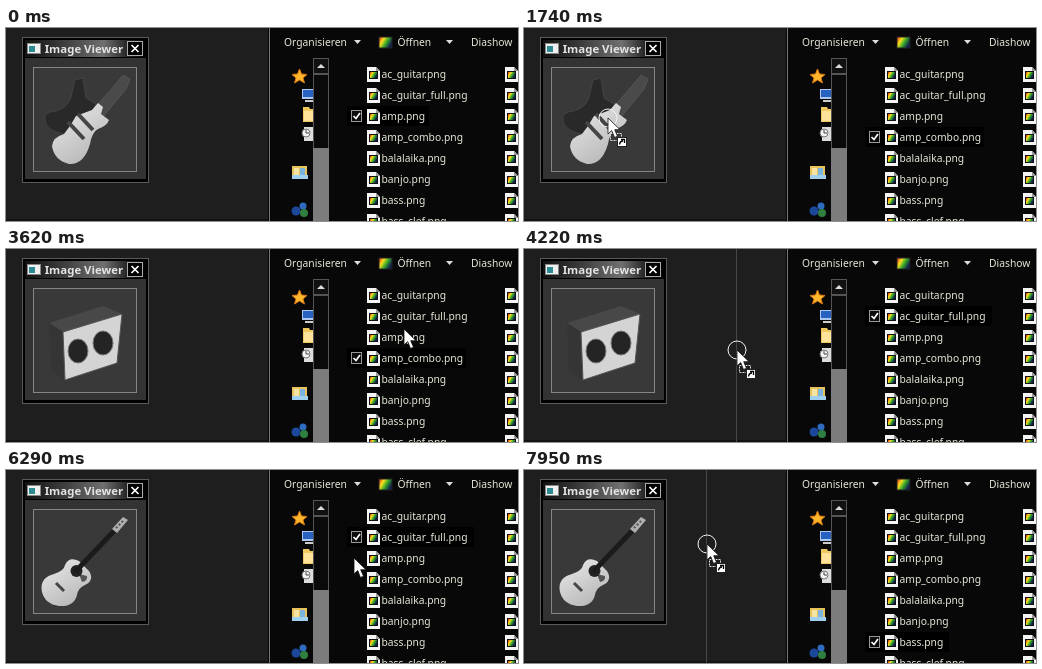
An HTML page that plays this animation: 512 px wide and 193 px high, repeating every 8000 ms.

```html
<!DOCTYPE html>
<html lang="de">
<head>
<meta charset="utf-8">
<title>Image Viewer</title>
<style>
html, body { margin: 0; width: 100%; height: 100%; overflow: hidden; background: #1e1e1e; }
svg { display: block; width: 512px; height: 193px; }
text { font: 10.3px "Noto Sans", "Open Sans", sans-serif; fill: #e8e6d8; }
.title { font-weight: bold; font-size: 11.4px; fill: #e4e4e4; }
</style>
</head>
<body>
<svg viewBox="0 0 512 193">
  <defs>
    <linearGradient id="bar"><stop stop-color="#111"/><stop offset=".3" stop-color="#3a3a3a"/><stop offset=".65" stop-color="#707070"/><stop offset=".85" stop-color="#222"/><stop offset="1" stop-color="#000"/></linearGradient>
    <linearGradient id="rainbow" x2="1" y2=".5"><stop stop-color="#e02810"/><stop offset=".35" stop-color="#f8e020"/><stop offset=".65" stop-color="#38a828"/><stop offset="1" stop-color="#102050"/></linearGradient>
    <linearGradient id="wood" x2=".6" y2="1"><stop stop-color="#ececec"/><stop offset="1" stop-color="#b8b8b8"/></linearGradient>
    <g id="file">
      <path d="M0 0H9L13 4V15H0Z" fill="#f4f4f4"/>
      <path d="M9 0V4H13Z" fill="#999"/>
      <path d="M2 4H11V12H2Z" fill="#111"/>
      <path d="M3 5H10V11H3Z" fill="url(#rainbow)"/>
    </g>
  </defs>

  <rect width="512" height="193" fill="#1e1e1e"/>
  <rect y="191" width="262" height="2" fill="#131313"/>
  <rect id="guide" width="1" height="193" fill="#484848"/>

  <!-- viewer window -->
  <rect x="16.5" y="9.5" width="126" height="145" fill="#000" stroke="#5a5a5a"/>
  <rect x="19" y="12" width="121" height="17" fill="url(#bar)"/>
  <rect x="21.5" y="15.500" width="13" height="10" fill="#f0f0f0" stroke="#888"/>
  <path d="M23 18H29V24H23Z" fill="#2c8a90"/>
  <text class="title" x="38.700" y="25">Image Viewer</text>
  <rect x="121.5" y="13.5" width="15" height="14" fill="#000" stroke="#aaa"/>
  <path d="M125.5 17L132.5 24M132.5 17L125.5 24" stroke="#fff" stroke-width="1.7"/>
  <rect x="19" y="30" width="121" height="121" fill="#333"/>
  <rect x="27.5" y="39.5" width="103" height="104" fill="#393939" stroke="#858585"/>

  <g class="pic">
    <path d="M39 92Q37 84 50 83Q64 79 66 65L69 52L77 50L80 70L90 76L86 102L58 106Q40 103 39 92Z" fill="#292929" stroke="#4b4b4b" stroke-width=".7"/>
    <path d="M86 83L108 58L117 47L124 51L120 61L96 90Z" fill="#4a4a4a" stroke="#5c5c5c" stroke-width=".7"/>
    <path d="M46 118Q47 109 58 106L64 98L70 88L86 82L92 75L97 79L95 86L103 92Q101 98 92 101Q86 104 84 116Q78 137 63 136Q48 132 46 118Z" fill="url(#wood)"/>
    <path d="M62 94L78 111M72 86L87 102" stroke="#444" stroke-width="4"/>
  </g>
  <g class="pic">
    <path d="M43 74L97 57L116 65L57 83Z" fill="#484848"/>
    <path d="M43 74L57 83L59 131L45 122Z" fill="#353535"/>
    <path d="M57 83L116 65L111 114L59 131Z" fill="#d4d4d4" stroke="#555"/>
    <g fill="#242424" stroke="#777">
      <ellipse cx="72" cy="102" rx="10" ry="12"/>
      <ellipse cx="97" cy="94" rx="10" ry="12"/>
    </g>
  </g>
  <g class="pic">
    <path d="M36 122Q33 108 48 104Q58 101 59 95Q63 86 73 91L83 101Q89 110 79 115Q72 118 71 125Q68 137 53 136Q39 134 36 122Z" fill="url(#wood)"/>
    <path d="M73 104L81 106Q82 111 76 112Z" fill="#555"/>
    <circle cx="70.500" cy="101" r="6" fill="#222"/>
    <path d="M69 102L109 60" stroke="#1b1b1b" stroke-width="5"/>
    <path d="M106 59L117 47L122 50L111 63Z" fill="#b0b0b0"/>
    <path d="M110 58L118 50" stroke="#555" stroke-width="2" stroke-dasharray="2 2"/>
    <path d="M50 113L58 121" stroke="#444" stroke-width="3"/>
  </g>

  <!-- file browser -->
  <rect x="262" width="250" height="193" fill="#080808"/>
  <rect x="263" width="1" height="193" fill="#777"/>
  <text x="278" y="18">Organisieren</text>
  <text x="391.500" y="18">Öffnen</text>
  <text x="465" y="18">Diashow</text>
  <path d="M348 12H355L351.500 16ZM440 12H447L443.500 16Z" fill="#ddd"/>
  <rect x="373" y="9" width="13" height="11" fill="url(#rainbow)" stroke="#222"/>

  <path d="M293.500 41L295.500 46L301 46.500L297 50L298.500 55L293.500 52L288.500 55L290 50L286 46.500L291.500 46Z" fill="#ffb52c" stroke="#d97812"/>
  <path d="M296 61H307V71H296Z" fill="#aec8ef"/><path d="M297 62H307V69H297Z" fill="#2862c0"/><path d="M299 72H307V74H299Z" fill="#ccc"/>
  <path d="M297 79H303L304 81H307V94H297Z" fill="#f0c860"/><path d="M298 83H307V93H298Z" fill="#ffe39a"/>
  <path d="M298 99H307V113H298Z" fill="#ddd"/><circle cx="300" cy="105" r="4" fill="#f4f4f4" stroke="#777"/><path d="M300 102V105H303" fill="none" stroke="#444"/>
  <path d="M286 138H301V151H286Z" fill="#e8c35c"/><path d="M288 140H293V147H288Z" fill="#f6e4a4"/><path d="M294 140H299V147H294Z" fill="#7bb4e0"/><path d="M286 147H302V151H286Z" fill="#9fd0f0"/>
  <circle cx="290" cy="183" r="4.500" fill="#1c489c"/><circle cx="297" cy="178" r="3.500" fill="#2f6cc0"/><circle cx="298" cy="185" r="4" fill="#2f8040"/>

  <rect x="307.500" y="46.500" width="15" height="146" fill="#0a0a0a" stroke="#555"/>
  <rect x="307.500" y="30.500" width="15" height="15" fill="#111" stroke="#555"/>
  <path d="M311 40H319L315 36Z" fill="#ddd"/>
  <rect x="307" y="120" width="16" height="73" fill="#7c7c7c"/>

  <rect id="band" x="341" height="20"/>
  <g id="files"></g>
  <g id="check" fill="none" stroke="#999">
    <rect x="345.500" y="-5.500" width="10" height="11" fill="#0c0c0c"/>
    <path d="M347.500 0L350 2.500L354 -3" stroke="#fff" stroke-width="1.700"/>
  </g>

  <g id="cursor">
    <circle id="ring" r="9" fill="none" stroke="#f2f2f2"/>
    <g id="link">
      <rect x="2.500" y="15.500" width="11" height="7" fill="none" stroke="#ddd" stroke-dasharray="2 1"/>
      <rect x="9.500" y="19.500" width="9" height="9" fill="#fff" stroke="#222"/>
      <path d="M11.500 26.500Q12 23 15 23M13 21.500H16.500V25" fill="none" stroke="#000" stroke-width="1.300"/>
    </g>
    <path d="M0 0V16L3.700 12.500L6.500 19.500L9.500 18.200L6.700 11.700H12Z" fill="#fff" stroke="#111" stroke-width=".8"/>
  </g>
</svg>
<script>
const $ = id => document.getElementById(id);
const names = ["ac_guitar", "ac_guitar_full", "amp", "amp_combo", "balalaika", "banjo", "bass", "bass_clef"];
const ends = [447, 468, 423, 460, 444, 429, 425, 441];
const rowY = i => 46 + 21 * i;
const LOOP = 8000, TICK = 58.5;

$("files").innerHTML = names.map((name, i) => {
  const y = rowY(i);
  return `<use href="#file" x="361" y="${y - 7}"/><use href="#file" x="499" y="${y - 7}"/>
    <text x="375.5" y="${y + 4}">${name}.png</text>`;
}).join("");
const labels = document.querySelectorAll("#files text");
const pics = document.querySelectorAll(".pic");

// start, end, ease-out power, then a quadratic curve: from, control, to
const moves = [
  [0, 620, 1, 390, 215, 390, 215, 390, 215],
  [620, 1090, 2, 390, 190, 385, 145, 394, 104],
  [1270, 1800, 2, 394, 104, 240, 125, 80, 89],
  [2780, 3380, 2, 80, 89, 250, 108, 400, 96],
  [3560, 3800, 2, 400, 96, 398, 75, 395, 67],
  [3980, 4700, 2, 395, 67, 224, 128, 67, 79],
  [5820, 6288, 1.3, 67, 79, 220, 45, 348, 88],
  [6290, 6580, 2, 348, 88, 390, 120, 408, 165],
  [6640, 7350, 1.5, 408, 165, 440, 178, 394, 174],
  [7650, 7942, 1.3, 394, 174, 300, 110, 183, 74]
];
// press, drag start, release
const drags = [[1270, 1330, 2040], [3980, 4040, 4950], [7470, 7650, LOOP]];
const picks = [[0, 2], [1030, 3], [3740, 1], [7230, 6]];
const shots = [[0, 0], [2040, 1], [4950, 2]];

const latest = (list, t) => list.filter(e => e[0] <= t).pop();

function pointer(t) {
  const [start, end, power, x0, y0, cx, cy, x1, y1] = latest(moves, t);
  const held = Math.floor((t - start) / TICK) * TICK;
  const u = 1 - (1 - Math.min(1, held / (end - start))) ** power, v = 1 - u;
  const curve = (a, b, c) => Math.round(v * v * a + 2 * u * v * b + u * u * c);
  return [curve(x0, cx, x1), curve(y0, cy, y1)];
}

function show(el, on) { el.style.display = on ? "" : "none"; }

function draw(now) {
  const t = now % LOOP;
  const [x, y] = pointer(t);
  const drag = drags.find(d => t >= d[0] && t < d[2]);
  const dragging = drag && t >= drag[1];
  const row = latest(picks, t)[1], cy = rowY(row);
  const hover = Math.abs(y - cy) <= 10 && x > 340 && x < ends[row];

  $("cursor").setAttribute("transform", `translate(${x} ${y})`);
  show($("ring"), drag);
  show($("link"), dragging);
  show($("guide"), dragging && x > 142 && x < 262);
  $("guide").setAttribute("x", x - 1);

  $("check").setAttribute("transform", `translate(0 ${cy})`);
  $("band").setAttribute("y", cy - 10);
  $("band").setAttribute("width", ends[row] - 341);
  $("band").setAttribute("fill", hover ? "#444" : "#000");
  labels.forEach((el, i) => el.style.fill = hover && i === row ? "#ff0" : "");
  pics.forEach((el, i) => show(el, i === latest(shots, t)[1]));
}

const t0 = performance.now();
function frame() {
  draw(performance.now() - t0);
  requestAnimationFrame(frame);
}
frame();
</script>
</body>
</html>
```
